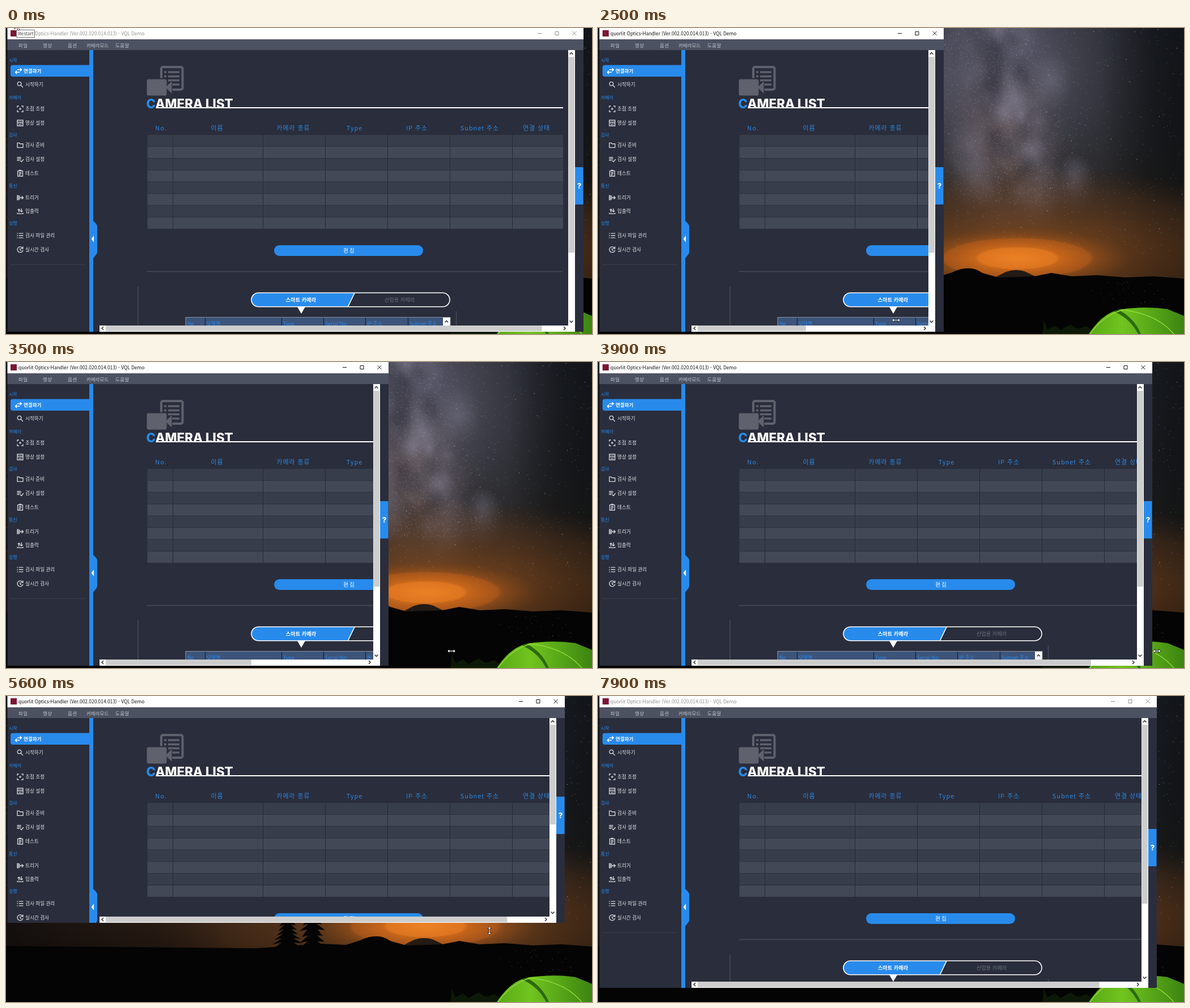
An HTML page that plays this animation: 1034 by 541 pixels, repeating every 8 s.

```html
<!DOCTYPE html>
<html lang="ko">
<head>
<meta charset="utf-8">
<title>Window resize</title>
<style>
html, body { margin: 0; width: 100%; height: 100%; overflow: hidden; background: #050505; }
svg { display: block; width: 1034px; height: 541px; }
text { font-family: "Noto Sans CJK KR", "Noto Sans", sans-serif; white-space: pre; }
.head { font-family: Inter, "Liberation Sans", sans-serif; font-weight: 800; }
</style>
</head>
<body>
<svg id="stage" viewBox="0 0 1034 541"></svg>
<script>
const BLUE = '#288bec', BODY = '#2a2d3b';
const stage = document.getElementById('stage');

const rect = (x, y, w, h, fill, extra = '') =>
  `<rect x="${x}" y="${y}" width="${w}" height="${h}" fill="${fill}" ${extra}/>`;
const path = (d, fill = 'none', extra = '') => `<path d="${d}" fill="${fill}" ${extra}/>`;
const oval = (x, y, rx, ry, fill, extra = '') =>
  `<ellipse cx="${x}" cy="${y}" rx="${rx}" ry="${ry}" fill="${fill}" ${extra}/>`;
const line = (d, color, width = 1) => path(d, 'none', `stroke="${color}" stroke-width="${width}"`);
const text = (x, y, s, size, fill, extra = '') =>
  `<text x="${x}" y="${y}" font-size="${size}" fill="${fill}" ${extra}>${s}</text>`;
const mid = (x, y, s, size, fill, extra = '') =>
  text(x, y, s, size, fill, 'text-anchor="middle" ' + extra);
const group = (id, body, extra = '') => `<g id="${id}" ${extra}>${body}</g>`;
const stops = list => list.map(([o, c, a = 1]) =>
  `<stop offset="${o}" stop-color="${c}" stop-opacity="${a}"/>`).join('');
const radial = (id, list) => `<radialGradient id="${id}">${stops(list)}</radialGradient>`;
const linear = (id, dir, list) => `<linearGradient id="${id}" x1="0" y1="0" ${dir}="1" ` +
  `${dir === 'y2' ? 'x2' : 'y2'}="0">${stops(list)}</linearGradient>`;

let seed = 7;
const rnd = () => (seed = (seed * 16807) % 2147483647) / 2147483647;
const bell = () => rnd() + rnd() + rnd() - 1.5;

function stars(count, color, alpha, place) {
  let d = '';
  for (let i = 0; i < count; i++) {
    const [x, y] = place();
    d += `M${x.toFixed(1)} ${y.toFixed(1)}h1`;
  }
  return path(d, 'none', `stroke="${color}" stroke-width="1" opacity="${alpha}"`);
}

// Soft light and dark patches along the bright band of the sky.
function clouds() {
  let out = '';
  for (let i = 0; i < 60; i++) {
    const y = rnd() * 300, x = 685 + y * 0.2 + bell() * 85, r = 22 + rnd() * 36;
    out += oval(x, y, r * 0.8, r, i % 2 ? 'url(#bright)' : 'url(#dark)');
  }
  return out;
}

function pine(x, top, base, half) {
  let left = `M${x} ${top}`, right = '';
  const tiers = 10;
  for (let i = 1; i <= tiers; i++) {
    const y = top + (base - top) * i / tiers, w = half * Math.sqrt(i / tiers) * (0.75 + rnd() * 0.3);
    left += `L${x - w} ${y + 1}L${x - w * 0.4} ${y - 2}`;
    right = `L${x + w * 0.4} ${y - 2}L${x + w * 0.95} ${y - 1}` + right;
  }
  return path(left + right + 'Z', '#040404') + rect(x - 4, base - 6, 8, 30, '#040404');
}

function scenery() {
  return rect(0, 0, 1034, 541, '#040404') +
    rect(0, 0, 1034, 448, 'url(#sky)') +
    oval(700, 70, 330, 330, 'url(#haze)') +
    oval(725, 230, 130, 190, 'url(#dust)', 'transform="rotate(-12 725 230)"') +
    clouds() +
    rect(0, 0, 1034, 448, 'url(#shade)') +
    oval(745, 400, 480, 160, 'url(#dusk)') +
    oval(740, 407, 200, 54, 'url(#glow)') +
    stars(1100, '#cfd3df', 0.35, () => [rnd() * 1034, rnd() * 400]) +
    stars(2200, '#c8c3d6', 0.3, () => { const y = rnd() * 310; return [685 + y * 0.2 + bell() * 130, y]; }) +
    stars(90, '#ffffff', 0.7, () => [rnd() * 1034, rnd() * 400]) +
    path('M695 444L718 432Q735 425 752 430L782 444Z', '#241a15') +
    path('M0 442L440 446L470 444L556 438L600 440L625 432Q656 417 678 433L706 441L770 439L800 433L836 439L880 437L930 441L980 439L1034 443V541H0Z', '#040404') +
    pine(541, 342, 446, 27) + pine(497, 367, 446, 27) +
    stars(26, '#a08f78', 0.5, () => [870 + rnd() * 150, 446 + rnd() * 42]) +
    path('M784 541L787 517L793 533L806 526L816 534L834 524L846 532L862 527L880 541Z', '#0c1907') +
    path('M866 541Q890 504 920 498Q965 491 1005 497L1034 509V541Z', 'url(#tent)') +
    path('M918 498Q946 512 958 541H953Q940 514 910 501Z', '#2c6a0c') +
    line('M922 498Q985 504 1016 541M868 541Q892 508 924 499', '#8fd83a', 1.5);
}

const icons = {
  swap: 'M8 8H22M17 3l5 5-5 5M16 16H2M7 11l-5 5 5 5',
  search: 'M15.500 9.500a6 6 0 1 1-12 0a6 6 0 1 1 12 0M14 14l7 7',
  focus: 'M3 8V3h5M16 3h5v5M21 16v5h-5M8 21H3v-5M10 12a2 2 0 1 1 4 0a2 2 0 1 1-4 0',
  image: 'M3 3h18v18H3zM3 9h18M6 13h3M11 13h3M16 13h3M8 17h3M13 17h3',
  folder: 'M3 5h6l2 3h10v12H3z',
  check: 'M2 6h13M2 11h13M2 16h8M12 16l4 4 7-8',
  board: 'M4 4h16v17H4zM9 4V2h6v2M8 9h8M8 13h8M8 17h5',
  trigger: 'M3 4v16M6 4v16M10 5v14M11 12h11M17 7l5 5-5 5',
  io: 'M8 16V5M4 9l4-4 4 4M16 3v11M12 10l4 4 4-4M2 20h20M3 17v3M21 17v3',
  list: 'M2 5h3M8 5h14M2 12h3M8 12h14M2 19h3M8 19h14',
  clock: 'M19 6A9 9 0 1 0 21 13M21 2v6h-6M12 7v6l4 2'
};
const icon = (name, x, y, color) => path(icons[name], 'none',
  `stroke="${color}" stroke-width="2.500" transform="translate(${x - 6.6} ${y - 6.6}) scale(.55)"`);

function sidebar() {
  const heads = [['시작', 60], ['카메라', 126], ['검사', 192], ['통신', 282], ['실행', 348]];
  const items = [['search', '시작하기', 100], ['focus', '초점 조정', 143], ['image', '영상 설정', 168],
    ['folder', '검사 준비', 207], ['check', '검사 설정', 232], ['board', '테스트', 257],
    ['trigger', '트리거', 300], ['io', '입출력', 324], ['list', '검사 파일 관리', 367], ['clock', '실시간 검사', 392]];
  return heads.map(([s, y]) => text(5, y, s, 8, BLUE)).join('') +
    path('M12 65.500H148V86H12Q8 86 8 82V69.500Q8 65.500 12 65.500Z', BLUE) +
    icon('swap', 22, 76, '#fff') + text(31, 79, '연결하기', 8.5, '#fff', 'font-weight="700"') +
    items.map(([i, s, y]) => icon(i, 25, y, '#d4d6dc') + text(34, y + 3.2, s, 8.6, '#e2e4e8')).join('') +
    line('M8 418.500H140', '#3d404d') +
    rect(147, 39, 7, 502, BLUE) +
    path('M153 340L158 345Q161 348 161 351V396Q161 399 158 402L153 408Z', BLUE) +
    path('M155 367V379L150.500 373Z', '#fff');
}

function cameraIcon() {
  const c = '#5f626d';
  return rect(274, 69, 37.5, 40, 'none', `rx="3" stroke="${c}" stroke-width="4"`) +
    line('M279 78H283M286 78H306M279 85.500H283M286 85.500H306M279 92.500H283M286 92.500H306M292 100H306', c, 3.4) +
    rect(246.5, 88.5, 39, 32, BODY, 'rx="3"') +
    rect(248.5, 90.5, 35, 29, c, 'rx="3"') +
    path('M281 105L293 93V117Z', c, `stroke="${BODY}" stroke-width="1"`) + rect(279, 101, 4, 9, c);
}

function content() {
  const names = [['No.', 273.5], ['이름', 372.5], ['카메라 종류', 507], ['Type', 615],
    ['IP 주소', 725], ['Subnet 주소', 836], ['연결 상태', 936]];
  const cells = [['No', 320], ['모델명', 354], ['Type', 489], ['Serial No.', 563], ['IP 주소', 637], ['Subnet 주소', 712]];
  let out = cameraIcon() +
    `<text class="head" x="247.500" y="142" font-size="22.3" fill="#fff"><tspan fill="${BLUE}">C</tspan>AMERA LIST</text>` +
    line('M266 141H983', '#fff', 1.8);
  for (const [s, x] of names)
    out += mid(x, 181, s, 11, '#2a88e2', 'letter-spacing=".9" font-weight="300"');
  for (let i = 0; i < 8; i++)
    out += rect(249.5, 189 + i * 20.85, 733.5, 20, i % 2 ? '#434857' : '#383d4b');
  out += line([294.5, 453.5, 563.5, 673.5, 783.5, 893.5].map(x => `M${x} 189V356`).join(''), '#262936') +
    rect(473, 384, 263, 19, BLUE, 'rx="9.500"') +
    mid(605, 396.5, '편 집', 9.3, '#fff', 'font-weight="500"') +
    line('M249 430.500H982', '#484b57', 1.6) + line('M233 457V541M794.500 501V541', '#4a4d59', 1.4) +
    path('M445.500 468.500H615L603.500 492.500H445.500A12 12 0 0 1 445.500 468.500Z', BLUE) +
    rect(433, 468.3, 350, 24.4, 'none', 'rx="12.200" stroke="#fff" stroke-width="1.600"') +
    line('M615 468.500L603.500 492.500', '#fff', 1.6) +
    path('M514 493H528L521 505Z', '#fff') +
    mid(520.5, 483.8, '스마트 카메라', 9.2, '#fff', 'font-weight="700"') +
    mid(694.5, 483.8, '산업용 카메라', 9.2, '#6d717e') +
    rect(317, 511.5, 467, 40, '#3d547b', 'stroke="#8f939c" stroke-width="1"') +
    line([351.5, 486.5, 560.5, 634.5, 709.5].map(x => `M${x} 512V541`).join(''), '#1c2230', 1.2) +
    cells.map(([s, x]) => text(x, 526, s, 8.8, BLUE)).join('') +
    rect(771, 512, 12.5, 30, '#fff') + line('M774.500 520.500L777.300 517.500L780 520.500', '#333', 1.5);
  return out;
}

const menus = [['파일', 22], ['영상', 65], ['옵션', 109], ['카메라모드', 142], ['도움말', 193]];

stage.innerHTML = '<defs>' +
  linear('sky', 'y2', [[0, '#24272f'], [0.4, '#25272b'], [0.68, '#2e2824'], [0.86, '#3a281b'], [1, '#2e1c10']]) +
  linear('shade', 'x2', [[0, '#05070a', 0.7], [0.42, '#05070a', 0.1], [0.86, '#05070a', 0.1], [0.95, '#05080a', 0.5], [1, '#05080a', 0.6]]) +
  radial('haze', [[0, '#77748a', 0.85], [0.3, '#686678', 0.7], [0.6, '#4b4c57', 0.5], [1, '#33363c', 0]]) +
  radial('dust', [[0, '#94796f', 0.65], [0.5, '#746160', 0.4], [1, '#4a4444', 0]]) +
  radial('bright', [[0, '#a5a1b8', 0.3], [1, '#8f8a9c', 0]]) +
  radial('dark', [[0, '#26252e', 0.3], [1, '#26252e', 0]]) +
  radial('dusk', [[0, '#a0561c', 0.75], [0.45, '#6d401d', 0.6], [0.75, '#56351c', 0.4], [1, '#3a2415', 0]]) +
  radial('glow', [[0, '#ec8226', 1], [0.34, '#dd741f', 1], [0.38, '#c9671b', 0.95], [0.64, '#b35a1a', 0.8],
    [0.68, '#97501a', 0.65], [1, '#7a4318', 0]]) +
  linear('tent', 'x2', [[0, '#57a916'], [0.35, '#72c41f'], [0.65, '#58a818'], [1, '#3d8411']]) +
  '<clipPath id="frame"><rect id="frameBox" x="2.500" y="0"/></clipPath>' +
  '<clipPath id="view"><rect id="viewBox" x="154" y="39"/></clipPath></defs>' +
  group('photo', scenery()) +
  group('win',
    rect(2, 0, 1032, 541, BODY) + rect(2, 0, 1032, 20, '#fff') + rect(2, 20, 1032, 19, '#4d5263') +
    rect(8, 4, 11, 11, '#7d1535') +
    text(22, 13, 'quorlit Optics-Handler (Ver.002.020.014.013) - VQL Demo', 8.4, '#111', 'id="caption"') +
    group('buttons', line('M-81 9.500H-74M-50 6.500H-44V12.500H-50ZM-19.500 6L-12.500 13M-12.500 6L-19.500 13', 'currentColor')) +
    menus.map(([s, x]) => text(x, 33.6, s, 8.5, '#c0c3cb', x === 142 ? '' : 'letter-spacing=".4"')).join('') +
    group('page', content(), 'clip-path="url(#view)"') + sidebar() +
    group('vbar', rect(-27, 39, 12, 502, '#fff') + rect(-26.5, 51, 10.5, 0, '#cdcdcd', 'id="vthumb"') +
      line('M-24.500 46.500L-21.500 43.500L-18.500 46.500', '#333', 1.5)) +
    group('hbar', rect(165, -11, 0, 11, '#fff', 'id="htrack"') + rect(176, -11, 0, 10, '#cdcdcd', 'id="hthumb"') +
      line('M172 -9L169 -6L172 -3', '#333', 1.5)) +
    group('corner', rect(-28, -11, 13, 11, '#fff') +
      line('M-24.500 -19.500L-21.500 -16.500L-18.500 -19.500M-35 -9L-32 -6L-35 -3', '#333', 1.5)) +
    group('help', rect(-15, -33, 14.5, 66, BLUE) + mid(-7.5, 4.8, '?', 13, '#fff', 'class="head"')),
    'clip-path="url(#frame)"') +
  group('tip', rect(18.5, 3.5, 32, 13, '#fff', 'stroke="#767676"') + text(21.5, 12.8, 'Restart', 8.2, '#444')) +
  group('pointer', path('', '#fff', 'id="shape" stroke="#111" stroke-width=".8" stroke-linejoin="round"'));

const el = id => document.getElementById(id);
const set = (id, attrs) => { for (const k in attrs) el(id).setAttribute(k, attrs[k]); };
const move = (id, x, y) => set(id, { transform: `translate(${x} ${y})` });
const show = (id, on) => set(id, { visibility: on ? 'visible' : 'hidden' });

function track(keys, t) {
  let [t0, v0] = keys[0];
  for (const [t1, v1] of keys) {
    if (t < t1) return t <= t0 ? v0 : v0 + (v1 - v0) * (t - t0) / (t1 - t0);
    [t0, v0] = [t1, v1];
  }
  return v0;
}

const widths = [[2000, 1019], [2100, 985], [2300, 820], [2500, 610], [2600, 525], [2700, 475], [2800, 456],
  [2900, 456], [3000, 452], [3200, 452], [3300, 485], [3500, 675], [3700, 895], [3800, 950], [3900, 978],
  [4000, 985], [4200, 986]];
const heights = [[4600, 537], [4700, 535], [4900, 518], [5000, 496], [5100, 416], [5200, 375], [5300, 375],
  [5400, 380], [5700, 412], [6000, 466], [6100, 481], [6200, 494], [6300, 507], [6400, 516]];
const widthAt = t => Math.round(track(widths, t));
const heightAt = t => Math.round(track(heights, t));

const arrowTip = 'M0 0V16L3.800 12.500L6.300 18.500L9 17.400L6.500 11.500H11.500Z';
const sideways = 'M-7 0L-3.500 -3.500V-1H3.500V-3.500L7 0L3.500 3.500V1H-3.500V3.500Z';

// Pointer runs one tick ahead of the edge it drags.
function pointerAt(t) {
  if (t < 200) return ['arrow', 15, -14];
  if (t < 600) return ['arrow', track([[200, 110], [500, 1016]], t), track([[200, 40], [500, 471]], t)];
  if (t < 900) return null;
  if (t < 1400) return ['diagonal', 1020.5, track([[900, 536], [1300, 534]], t)];
  if (t < 4300) return ['side', widthAt(t + 100) + 1, track([[1900, 533], [2700, 511]], t)];
  if (t < 4400) return ['arrow', 930, 521];
  if (t < 6700) return ['updown', track([[4600, 868], [5000, 863], [6100, 845], [6400, 839]], t),
    Math.min(heightAt(t + 100) + 3, 534)];
  if (t < 6800) return ['arrow', 520, 290];
  if (t < 6900) return ['arrow', 67, 18];
  return null;
}

function draw(ms) {
  const t = Math.floor(ms / 100) * 100;
  const w = widthAt(t), h = heightAt(t);
  const ink = t < 200 || t >= 7900 ? '#8f8f8f' : '#111';
  set('frameBox', { width: w - 2.5, height: h });
  set('viewBox', { width: w - 181, height: h - 50 });
  set('caption', { fill: ink });
  set('buttons', { color: ink });
  move('buttons', w, 0);
  move('vbar', w, 0);
  move('hbar', 0, h);
  move('corner', w, h);
  move('help', w, 279 - Math.ceil((537 - h) / 2));
  set('htrack', { width: w - 192 });
  set('hthumb', { width: (w - 215) * (w - 193) / 863 });
  set('vthumb', { height: (h - 74) * (h - 51) / 650 });
  show('tip', t < 200);
  const p = pointerAt(t);
  show('pointer', !!p);
  if (p) {
    const turn = { side: 0, updown: 90, diagonal: 45, arrow: 0 }[p[0]];
    set('shape', { d: p[0] === 'arrow' ? arrowTip : sideways });
    set('pointer', { transform: `translate(${p[1]} ${p[2]}) rotate(${turn})` });
  }
}

const start = performance.now();
function tick() {
  draw((performance.now() - start) % 8000);
  requestAnimationFrame(tick);
}
tick();
</script>
</body>
</html>
```
